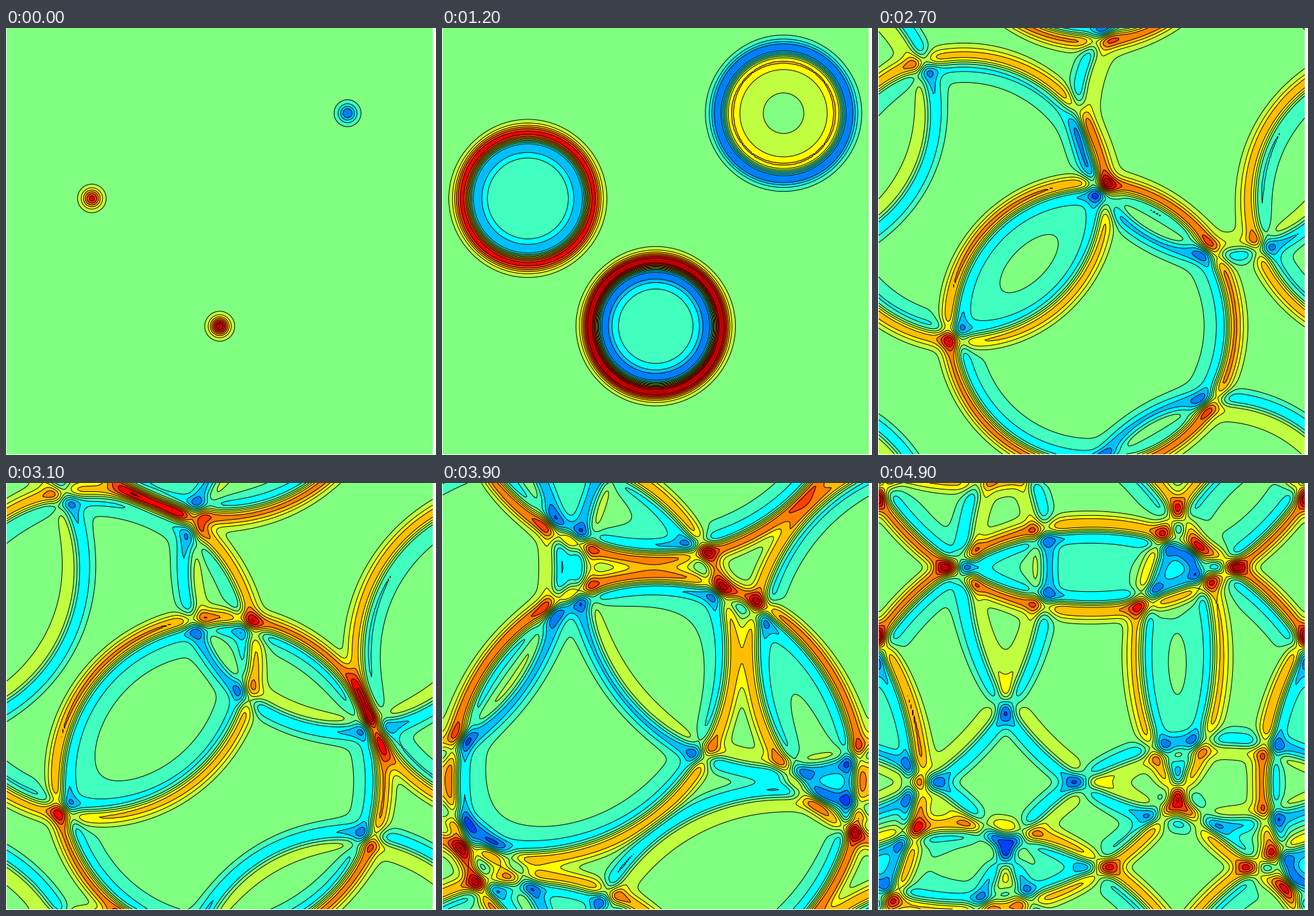
Animation of 669x663 px, one loop 5000 ms. Source, as a matplotlib script:

```python
import numpy as np
import matplotlib.pyplot as plt
from matplotlib.animation import FuncAnimation

# Ripples from three Gaussian drops on a periodic square (wave speed 1).
WIDTH, HEIGHT, DPI = 669, 663, 64
FRAMES, INTERVAL = 50, 100
END_TIME = 0.6
STEPS_PER_FRAME = 5
NODES = 251
SIGMA = 0.015
DROPS = [(0.5, 0.3, 1.0), (0.2, 0.6, 0.8), (0.8, 0.8, -0.6)]
BANDS = 15
LINE_PX = 1.0

grid = np.linspace(0, 1, NODES)
spacing = grid[1]
X, Y = np.meshgrid(grid, grid)
start = sum(a * np.exp(-((X - x) ** 2 + (Y - y) ** 2) / (2 * SIGMA ** 2))
            for x, y, a in DROPS)

# Each Fourier mode oscillates at the frequency of the leapfrog scheme.
dt = END_TIME / (FRAMES - 1) / STEPS_PER_FRAME
sx = np.sin(np.pi * np.fft.rfftfreq(NODES))[None, :]
sy = np.sin(np.pi * np.fft.fftfreq(NODES))[:, None]
omega = 2 / dt * np.arcsin(dt / spacing * np.hypot(sx, sy))
spectrum = np.fft.rfft2(start)


def height_at(frame):
    t = frame * STEPS_PER_FRAME * dt
    return np.fft.irfft2(spectrum * np.cos(omega * t), s=start.shape)


def jet(k):
    """Colour of band k, counted from the middle band."""
    return tuple(np.clip(1.5 - abs(k / 4 + shift), 0, 1) for shift in (-1, 0, 1))


colors = [jet(k) for k in range(-(BANDS // 2), BANDS // 2 + 1)]

fig = plt.figure(figsize=(WIDTH / DPI, HEIGHT / DPI), dpi=DPI, facecolor="white")
ax = fig.add_axes([1 / WIDTH, 1.5 / HEIGHT, 663 / WIDTH, 661.5 / HEIGHT])


def draw(frame):
    ax.clear()
    ax.set_axis_off()
    u = height_at(frame)
    peak = np.abs(u).max()
    # Slightly inside the peak, so that exact extremes still leave a dot.
    levels = np.linspace(-peak, peak, BANDS + 1) * 0.999
    fill_levels = levels.copy()
    fill_levels[[0, -1]] *= 2
    ax.contourf(X, Y, u, levels=fill_levels, colors=colors)
    ax.contour(X, Y, u, levels=levels, colors="black", linestyles="solid",
               linewidths=LINE_PX * 72 / DPI)
    ax.set(xlim=(0, 1), ylim=(0, 1))
    return []


anim = FuncAnimation(fig, draw, frames=FRAMES, interval=INTERVAL,
                     init_func=lambda: draw(0), repeat=True, repeat_delay=0)
plt.show()
```
